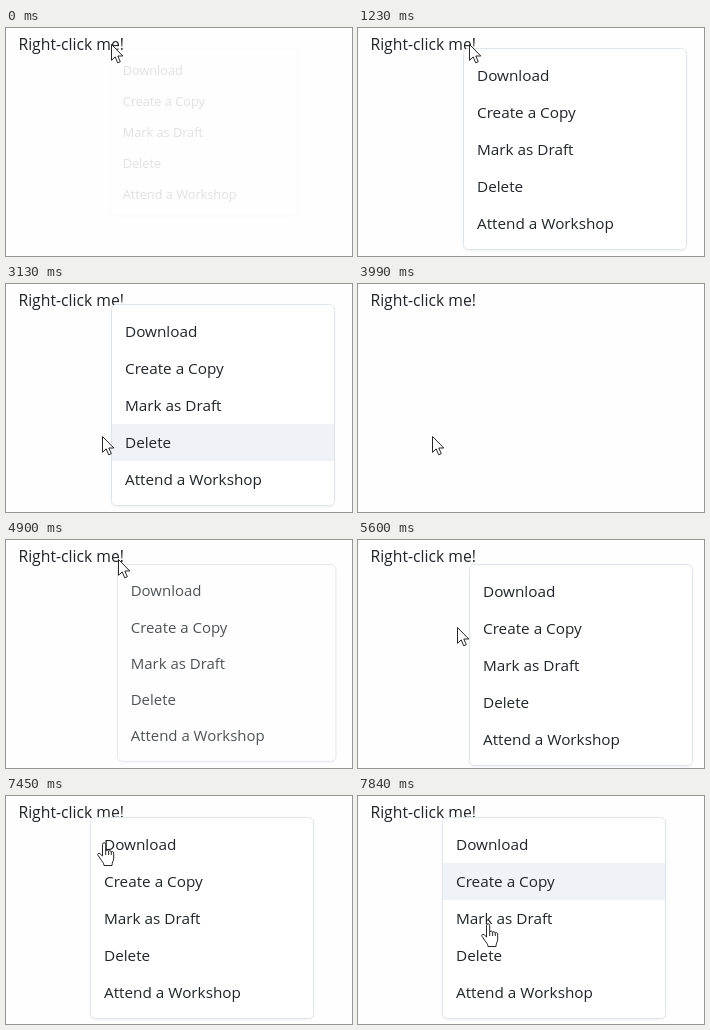
These frames come from a looping animation (346x228 px, 7990 ms). An HTML page:

```html
<!DOCTYPE html>
<html lang="en">
<head>
<meta charset="utf-8">
<title>Context menu</title>
<style>
  html, body { margin: 0; width: 100%; height: 100%; overflow: hidden; background: #fefefe; }
  svg { display: block; }
  text { font-family: "Open Sans", "Noto Sans", sans-serif; fill: #212529; }
  .title { font-size: 15.75px; }
  .item { font-size: 15.3px; }
  .panel { fill: #fff; stroke: #e0e4ed; filter: drop-shadow(0 1px 1px rgba(30, 40, 70, .06)); }
  .pointer path { fill: #fff; stroke: #1c1c1c; stroke-width: .95; stroke-linejoin: round; }
</style>
</head>
<body>
<svg width="346" height="228" viewBox="0 0 346 228">
  <text class="title" x="12.4" y="22">Right-click me!</text>
  <g id="menu">
    <rect class="panel" x=".5" y=".5" width="223" height="201" rx="5"/>
    <rect id="hot" x="1" width="222" height="37" fill="#eff3f7"/>
    <g id="items"></g>
  </g>
  <g class="pointer">
    <path id="arrow" d="M-.5.5V16.3L3.2 12.9 5.7 18.8 8.3 17.7 5.8 12H10.8Z"/>
    <path id="hand" transform="translate(-6 0)" d="M5.5 14V2.4a1.6 1.6 0 0 1 3.2 0V9a1.5 1.5 0 0 1 2.9.4a1.5 1.5 0 0 1 2.7.6a1.4 1.4 0 0 1 2.4 1V16C16.7 19 15 20 15 23.5H7C7 21 5 19.5 3.5 17L1 13.3C0 11.7 1.8 10.6 3.2 11.8ZM8.7 9v4M11.6 9.4V13M14.3 10v3"/>
  </g>
</svg>
<script>
const LOOP = 7990, STEP = 140, LAG = 130;
const ROW = 37, PAD = 9, WIDTH = 224;
const $ = id => document.getElementById(id);
const labels = ['Download', 'Create a Copy', 'Mark as Draft', 'Delete', 'Attend a Workshop'];

$('items').innerHTML = labels.map((label, i) =>
  `<text class="item" x="14" y="${33 + i * ROW}">${label}</text>`).join('');

// Each move runs straight from the last resting point to x, y.
const moves = [
  { from: 1090, to: 1230, x: 112, y: 16 },
  { from: 1230, to: 1930, x: 169, y: 119 },
  { from: 1930, to: 2180, x: 196, y: 177 },
  { from: 2180, to: 2480, x: 199, y: 181 },
  { from: 2860, to: 3130, x: 97, y: 152 },
  { from: 3130, to: 3290, x: 75, y: 152 },
  { from: 3850, to: 4600, x: 113, y: 19 },
  { from: 4900, to: 5720, x: 97, y: 100 },
  { from: 5850, to: 6390, x: 86, y: 19 },
  { from: 7300, to: 7840, x: 129, y: 127 }
];

const menus = [
  { from: -20, to: 3590, x: 105, y: 20 },
  { from: 4750, to: 6000, x: 111, y: 24 },
  { from: 6800, to: LOOP, x: 84, y: 21 }
];

// The picture refreshes in steps, so motion advances by whole steps.
function progress(t, from, to) {
  const steps = Math.round((to - from) / STEP);
  const u = Math.min(1, Math.max(0, (t - from) / (to - from)));
  return Math.floor(u * steps + 1e-6) / steps;
}

function pointerAt(t) {
  let x = 106, y = 16;
  for (const m of moves) {
    const u = progress(t, m.from, m.to);
    x += (m.x - x) * u;
    y += (m.y - y) * u;
  }
  return { x, y };
}

function rowAt(menu, { x, y }) {
  const row = Math.floor((y - menu.y - PAD) / ROW);
  const inside = x > menu.x && x < menu.x + WIDTH && row >= 0 && row < labels.length;
  return inside ? row : -1;
}

const show = (id, on) => $(id).setAttribute('visibility', on ? 'visible' : 'hidden');

function drawMenu(menu, t) {
  const rest = 1 - progress(t, menu.from, menu.from + 2 * STEP);
  const scale = 1 - .167 * rest ** 3;
  $('menu').setAttribute('transform', `translate(${menu.x} ${menu.y}) scale(${scale})`);
  $('menu').setAttribute('opacity', 1 - .87 * rest ** 2);

  // The highlight trails the pointer.
  const row = rowAt(menu, pointerAt(t - LAG));
  $('hot').setAttribute('y', PAD + row * ROW);
  $('hot').setAttribute('display', row < 0 ? 'none' : 'inline');
}

function draw(t) {
  const menu = menus.find(m => t >= m.from && t < m.to);
  $('menu').setAttribute('display', menu ? 'inline' : 'none');
  if (menu) drawMenu(menu, t);

  const tip = pointerAt(t);
  const overItem = menu && rowAt(menu, tip) >= 0;
  show('hand', overItem);
  show('arrow', !overItem);
  document.querySelector('.pointer').setAttribute('transform',
    `translate(${Math.round(tip.x)} ${Math.round(tip.y)})`);
}

const start = performance.now();
function tick() {
  draw((performance.now() - start) % LOOP);
  requestAnimationFrame(tick);
}
tick();
</script>
</body>
</html>
```
